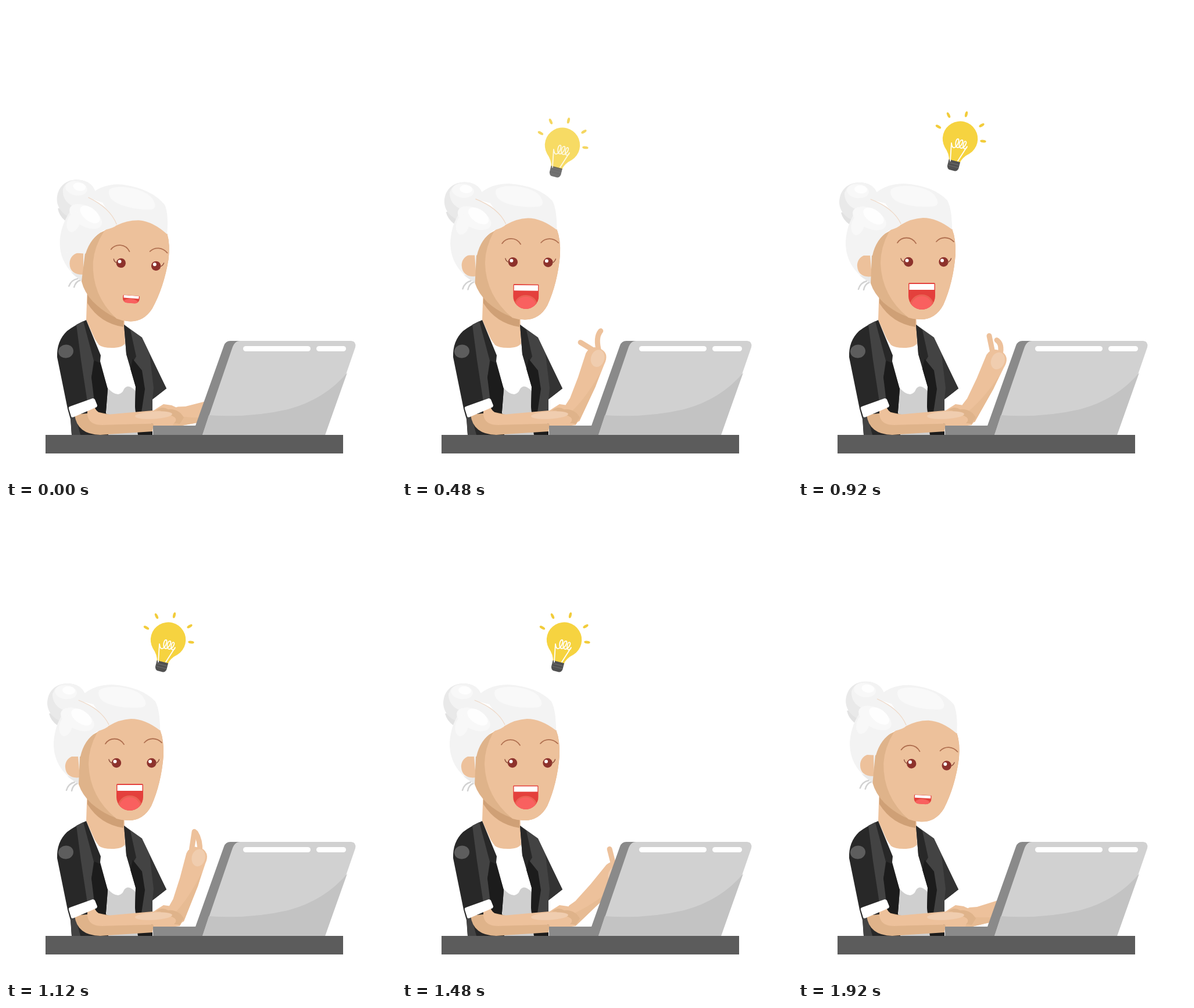
Animation, 671 px wide and 815 px high, one loop 1.96 s. Source, as an HTML page with a canvas:

```html
<!DOCTYPE html>
<html lang="en">
<head>
<meta charset="utf-8">
<title>Bright idea</title>
<style>
  html, body { margin: 0; width: 100%; height: 100%; overflow: hidden; background: #fff; }
  canvas { display: block; }
</style>
</head>
<body>
<canvas id="stage" width="671" height="815"></canvas>
<script>
const ctx = document.getElementById('stage').getContext('2d');
const LOOP = 1960, STEP = 40;
const SKIN = '#edc19b', SHADE = '#dfb38a', DEEP = '#cfa076', GLOW = '#f0cdaf';
const HAIR = '#f3f3f3', BLACK = '#282828', INK = '#1c1c1c', GREY = '#434343';

const clamp = v => Math.max(0, Math.min(1, v));
const mix = (a, b, k) => a + (b - a) * k;

// Piecewise linear value; keys are [time, value]
function track(t, keys) {
  for (let i = 1; i < keys.length; i++) {
    const [t0, v0] = keys[i - 1], [t1, v1] = keys[i];
    if (t <= t1) return mix(v0, v1, clamp((t - t0) / (t1 - t0)));
  }
  return keys[keys.length - 1][1];
}

function fill(d, color) {
  ctx.fillStyle = color;
  ctx.fill(new Path2D(d));
}

function line(d, color, width) {
  ctx.strokeStyle = color;
  ctx.lineWidth = width;
  ctx.lineCap = ctx.lineJoin = 'round';
  ctx.stroke(new Path2D(d));
}

function oval(x, y, rx, ry, color, turn = 0) {
  ctx.fillStyle = color;
  ctx.beginPath();
  ctx.ellipse(x, y, rx, ry, turn, 0, Math.PI * 2);
  ctx.fill();
}

function pill(x, y, w, h, color) {
  ctx.fillStyle = color;
  ctx.beginPath();
  ctx.roundRect(x, y, w, h, h / 2);
  ctx.fill();
}

function group(draw) {
  ctx.save();
  draw();
  ctx.restore();
}

function drawNeck() {
  fill('M140 480L138 541L160 590L205 590L203 520Z', SKIN);
  fill('M140 485V512Q162 547 202 553L203 520Z', DEEP);
}

function drawBody() {
  // shirt
  fill('M150 570L160 584Q166 589 182 589Q200 589 204 582L225 640L229 739H172L168 640Z', '#fff');
  fill('M174 657Q184 669 193 669Q200 668 203 660Q207 654 213 656Q220 659 223 664L229 739H172Z', '#cfcfcf');
  // left half of the jacket
  fill('M138 541Q118 550 105 560Q87 577 88 605L106 694L111 712L113 739H176L172 700L175 660L162 612L163 602Z', BLACK);
  fill('M121 549L133 543L151 611L147 640L154 678L140 682L129 610Z', GREY);
  fill('M152 611L162 615L175 660L172 700L176 739H158L152 682L147 640Z', INK);
  fill('M111 706L119 704L128 739H113Z', GREY);
  oval(103, 595, 13, 11.5, '#5d5d5d', -0.15);
  // right half
  fill('M203 549L234 571L276 659L252 678V739H227L222 690L223 656L207 600Z', GREY);
  fill('M247 600L276 659L252 678L254 658Z', '#333');
  fill('M203 549L214 558L224 604L219 612L224 656L207 600Z', BLACK);
  fill('M218 608L234 628L239 660L233 700L252 697V739H227L222 690L223 656L214 625Z', INK);
}

const thumbKeys = [[520, 0], [720, 0], [920, .6], [1120, 1], [1240, .7], [1480, .33], [1960, 0]];

function drawFarArm(t) {
  const turn = track(t, [[0, 83], [520, 24], [720, 24], [900, 34], [1100, 24], [1240, 33], [1960, 83]]);
  const k = track(t, thumbKeys);
  const a = mix(-1.57, -.3, k), len = mix(22, 29, k);
  const tx = -17 + Math.sin(a) * len, ty = -118 - Math.cos(a) * len;
  const fx = track(t, [[720, -18], [920, -21], [1120, -23], [1480, -18]]);
  const fy = track(t, [[720, -152], [920, -137], [1120, -145], [1480, -152]]);
  const bend = track(t, [[720, -21], [920, -9], [1120, -10], [1480, -21]]);

  fill('M252 698L271 686L285 688L300 695L306 710L299 722L252 728Z', SKIN);
  group(() => {
    ctx.translate(285, 702);
    ctx.rotate(turn * Math.PI / 180);
    line(`M-2 -118Q${bend} -137 ${fx} ${fy}`, SKIN, 9);
    line(`M-17 -117L${tx} ${ty}`, SKIN, 9);
    fill('M-10 -12L-9 -25L-14 -63L-22 -106Q-22 -119 -12 -123Q2 -128 10 -120Q15 -114 15 -104L20 -63L24 2Q12 22 -4 14Z', SKIN);
    fill('M24 2L20 -63L16 -88Q15 -40 5 -8Z', '#e7bb93');
    oval(0, -108, 11.5, 15, GLOW, -.2);
  });
  fill('M252 678L276 660L289 670L254 697Z', '#fff');
  fill('M258 697Q268 688 279 695Q296 693 306 709L299 720Q288 718 252 715Z', SHADE);
}

function drawNearArm() {
  fill('M118 704Q122 738 162 739L252 733L254 720L160 700Z', SHADE);
  fill('M140 696L152 690Q156 703 174 704L252 697Q285 697 298 702Q303 713 291 719Q220 720 166 722Q142 722 140 704Z', SKIN);
  fill('M266 697Q291 694 301 702Q305 712 298 719L289 719Q302 707 266 701Z', SHADE);
  oval(254, 705, 32, 6.5, GLOW, -.06);
  fill('M108 694Q107 691 110 690L149 676Q152 676 153 678L157 688Q157 691 154 692L117 708Q113 710 112 707Z', '#fff');
}

function drawLaptop() {
  fill('M253 723H326L375 585Q378 577 386 577H410L345 739H253Z', '#8a8a8a');
  fill('M338 739L389 590Q393 577 403 577H594Q603 578 601 588L549 739Z', '#d1d1d1');
  fill('M338 739L349 705Q420 710 485 695Q548 678 587 632L549 739Z', '#c3c3c3');
  pill(408, 586, 116, 9, '#fff');
  pill(534, 586, 51, 9, '#fff');
  fill('M68 739H580V771H68Z', '#5c5c5c');
}

function drawMouth(joy) {
  const x = mix(198, 190, joy), w = mix(29, 46, joy);
  const y = mix(495, 477, joy), h = mix(13.5, 46, joy);
  const r = Math.min(w / 2, h * .6), teeth = mix(4.5, 10, joy);
  group(() => {
    ctx.beginPath();
    ctx.roundRect(x, y, w, h, [2, 2, r, r]);
    ctx.clip();
    ctx.fillStyle = '#e4403c';
    ctx.fillRect(x, y, w, h);
    oval(x + w / 2, y + h * .88, w * .42, h * .41, '#f9605f');
    ctx.strokeStyle = '#ea6153';
    ctx.lineWidth = mix(1, 3, joy);
    ctx.stroke();
    ctx.fillStyle = '#fff';
    ctx.fillRect(x + 1.5, y + mix(.5, 2, joy), w - 3, teeth);
  });
}

function drawHead(tilt, joy) {
  group(() => {
    ctx.translate(171, 537);
    ctx.rotate(.082 * tilt);
    ctx.translate(-171, -537);

    // bun
    fill('M74 356Q77 368 88 376L92 368L106 374L100 350Z', '#e2e2e2');
    fill('M71 337C72 315 88 304 106 304C126 304 138 318 137 332L104 372C84 368 71 355 71 337Z', '#e9e9e9');
    fill('M80 322C84 309 95 304 106 304C128 304 139 319 137 334L108 352C92 350 80 340 80 322Z', HAIR);
    oval(103, 319, 19, 12, '#f8f8f8', .1);
    oval(108, 316, 11, 7, '#fefefe', .1);

    // back hair and loose strands
    line('M104 488Q107 477 118 474M113 489Q115 479 123 476', '#d2d2d2', 2.5);
    fill('M124 332C98 345 82 378 82 410C83 440 98 462 127 478L140 400Z', HAIR);
    fill('M106 464Q115 472 127 478L126 465Z', '#e9e9e9');
    fill('M124 429C110 427 101 437 102 449C103 462 113 468 127 466Z', SKIN);

    // face
    fill('M125 478L127 430Q130 408 150 392L178 376Q220 340 265 384Q272 402 271 428Q267 477 250 515Q236 541 209 540Q178 537 147 511Q131 496 125 478Z', SHADE);
    fill('M157 388Q142 416 142 443Q144 500 190 537Q199 540 209 540Q236 541 250 515Q267 477 271 428Q272 402 265 384Q220 330 157 388Z', SKIN);

    // fringe
    fill('M123 333Q145 306 182 306Q232 309 257 335Q265 350 265 385Q239 365 215 365Q195 366 177 377L150 340Z', HAIR);
    fill('M160 316C174 305 220 310 234 325C242 335 243 343 234 345C208 348 174 343 163 331Q157 322 160 316Z', '#f9f9f9');
    fill('M123 333Q166 345 178 376Q173 382 156 387Q134 402 128 430L95 430L84 400Q90 350 123 333Z', HAIR);
    oval(123, 366, 31, 17, '#f8f8f8', .45);
    oval(103, 377, 11, 18, '#f8f8f8', .25);
    oval(130, 362, 20, 11, '#fefefe', .6);
    line('M125 333Q164 348 177 375', '#efd7c4', 1.2);

    // eyes and brows
    for (const x of [190, 250.5]) {
      oval(x, 441, 8.2, 8.2, '#8d322c');
      oval(x - 2.5, 438.5, 3, 3, '#fff');
    }
    line('M177 435Q178 440 184 442M263.5 435Q262 440 257 442', '#8d4f3c', 1.4);
    const b = 11 * (1 - joy);
    line(`M171 ${408 + b}C178 ${397 + b} 195 ${396 + b} 203 ${409 + b}M238 ${406 + b}C246 ${397 + b} 259 ${397 + b} 268 ${406 + b}`, '#b07050', 1.8);

    drawMouth(joy);
  });
}

function drawRays() {
  for (const [x, y] of [[241.5, 208], [259, 188], [289.5, 186.5], [316, 205.5], [318.5, 233]])
    oval(x, y, 5.2, 2.3, '#f2cc3b', Math.atan2(y - 229, x - 279));
}

function drawBulb(t) {
  const rise = clamp((t - 312) / 208);
  const alpha = rise * track(t, [[1760, 1], [1920, 0]]);
  if (alpha <= 0) return;
  group(() => {
    ctx.globalAlpha = alpha;
    ctx.translate(-16 * (1 - rise), 57 * (1 - rise));
    drawRays();
    group(() => {
      ctx.translate(279, 229);
      ctx.rotate(.25);
      fill('M-9.5 41Q-11 30 -22 20.5A30.2 30.2 0 1 1 22 20.5Q11 30 9.5 41Z', '#f6d340');
      fill('M-10 39H10V50Q9 55 5 56H-5Q-9 55 -10 50Z', '#505050');
      line('M-9 44H9M-9 49H9', '#6b6b6b', 1.2);
    });
    line('M262 267L264 236Q265 245 269 244C275 242 279 229 275 229C271 229 269 244 275 244C281 243 286 231 282 231C277 231 275 245 281 245C287 244 292 234 288 233C284 234 282 246 287 246Q290 246 291 242L275 267', '#fff', 1.8);
  });
}

function draw(t) {
  const tilt = track(t, [[0, 1], [540, 0], [1800, 0], [1978, 1]]);
  const joy = track(t, [[0, 0], [535, 1], [1400, 1], [1960, 0]]);
  ctx.fillStyle = '#fff';
  ctx.fillRect(0, 0, 671, 815);
  drawNeck();
  drawBody();
  drawHead(tilt, joy);
  drawFarArm(t);
  drawNearArm();
  drawLaptop();
  drawBulb(t);
}

const start = performance.now();
function frame() {
  const t = (performance.now() - start) % LOOP;
  draw(Math.floor(t / STEP) * STEP);
  requestAnimationFrame(frame);
}
frame();
</script>
</body>
</html>
```
